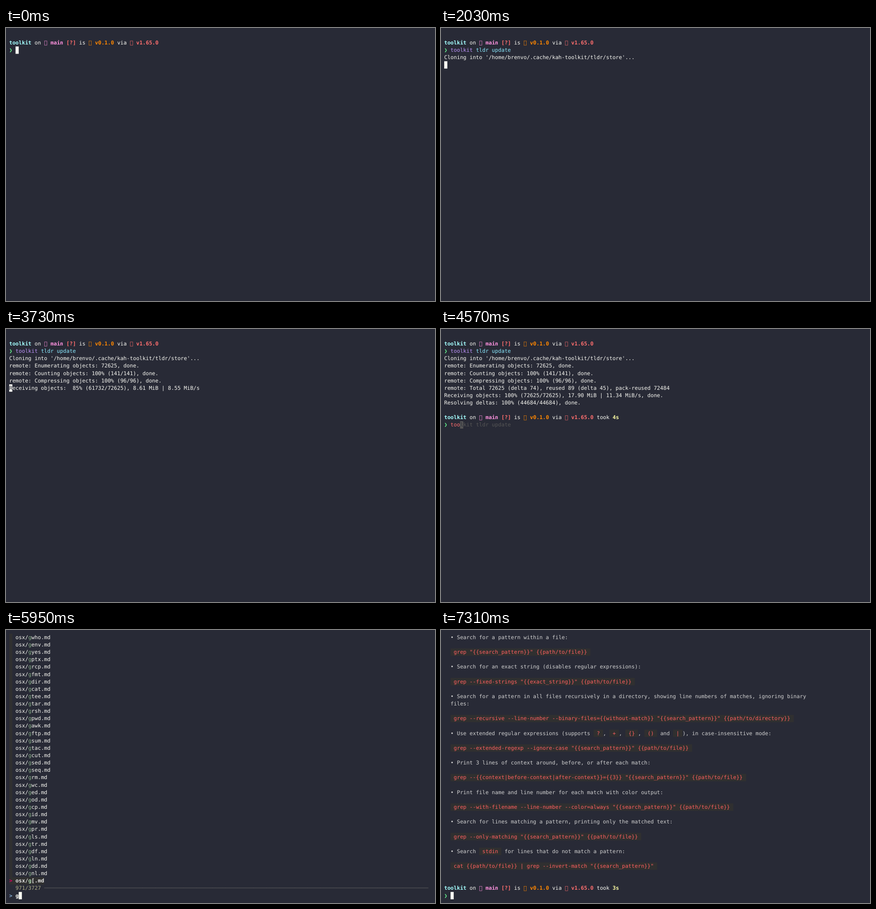
Write an HTML page that moves like this. It is 938x597 px and loops after 8 s.

```html
<!DOCTYPE html>
<html lang="en">
<head>
<meta charset="utf-8">
<title>Terminal session</title>
<style>
html, body { margin: 0; width: 100%; height: 100%; overflow: hidden; background: #282a36; }
svg { display: block; width: 100%; height: 100%; }
text {
  font: 11.541px "DejaVu Sans Mono", monospace;
  font-variant-ligatures: none;
  text-rendering: geometricPrecision;
  white-space: pre;
}
.b { font-weight: bold; }
</style>
</head>
<body>
<svg id="screen" viewBox="0 0 938 597"></svg>
<script>
const LOOP = 8000, COL = 938 / 135, ROW = 597 / 37, BASE = 11.8;
const BG = '#282a36', FG = '#f8f8f2', RED = '#ff6e6e', PURPLE = '#bd93f9', CYAN = '#8be9fd',
      DIM = '#555555', SHADE = '#303030';
const screen = document.getElementById('screen');
const left = col => (col + 1) * COL;
const top_ = row => (row + .5) * ROW;
let out = '';

function put(col, row, text, color = FG, bold = false) {
  out += `<text x="${left(col)}" y="${top_(row) + BASE}" fill="${color}"${bold ? ' class="b"' : ''}>${text}</text>`;
}
function block(col, row, cols, color, rows = 1) {
  out += `<rect x="${left(col)}" y="${top_(row)}" width="${cols * COL}" height="${rows * ROW}" fill="${color}"/>`;
}
function cursor(col, row, char = '', color = FG) {
  block(col, row, 1, color);
  if (char) put(col, row, char, BG);
}
// Empty box shown for a missing icon glyph
function icon(col, row, color) {
  out += `<rect x="${left(col) + .85}" y="${top_(row) + BASE - 7.85}" width="5.25" height="9.6" fill="none" stroke="${color}" stroke-width=".65"/>`;
}

function prompt(row, took) {
  put(0, row, 'toolkit', '#a4ffff', true);
  put(8, row, 'on');
  icon(11, row, '#ff92df');
  put(13, row, 'main', '#ff92df', true);
  put(18, row, '[?]', RED, true);
  put(22, row, 'is');
  icon(25, row, '#ff8700');
  put(27, row, 'v0.1.0', '#ff8700', true);
  put(34, row, 'via');
  icon(38, row, RED);
  put(40, row, 'v1.65.0', RED, true);
  if (took) {
    put(48, row, 'took');
    put(53, row, took, '#ffffa5', true);
  }
  put(0, row + 1, '❯', '#69ff94', true);
}

const COMMAND = 'toolkit tldr update';
function command(row, n, entered) {
  put(2, row, COMMAND.slice(0, Math.min(n, 7)), n < 7 ? RED : PURPLE);
  put(9, row, COMMAND.slice(7, Math.max(n, 7)), CYAN);
  if (entered) return;
  const hint = n ? COMMAND.slice(n) : '';
  put(3 + n, row, hint.slice(1), DIM);
  cursor(2 + n, row, hint[0], hint ? DIM : FG);
}

const firstKeys = Array.from({ length: 19 }, (_, i) => i < 8 ? 550 + 67 * i : 1180 + 61 * (i - 8));
const secondKeys = [4330, 4390, 4570, 4670, 4840, 4910, 4980, 5060, 5250, 5310, 5370, 5430];
const pressed = (keys, t) => keys.filter(k => k <= t).length;

function progress(label, pct, total, tail = '') {
  const n = Math.max(1, Math.ceil(total * pct / 100));
  return `${label}: ${String(pct).padStart(3)}% (${n}/${total})${tail}`;
}

function receiving(t) {
  const u = Math.floor((t - 3050) / 45) * 45 / 765;
  const rate = t < 3230 ? '' : t < 3500 ? ', 1.25 MiB | 2.48 MiB/s'
    : t < 3770 ? ', 8.61 MiB | 8.55 MiB/s' : ', 15.42 MiB | 10.21 MiB/s';
  return progress('Receiving objects', Math.floor(100 * u ** 1.22), 72625, rate);
}

function clone(t) {
  const lines = ["Cloning into '/home/brenvo/.cache/kah-toolkit/tldr/store'..."];
  let onLast = false;
  if (t >= 2840) {
    lines.push('remote: Enumerating objects: 72625, done.',
      progress('remote: Counting objects', 100, 141, ', done.'),
      t < 2890 ? progress('remote: Compressing objects', 1, 96)
               : progress('remote: Compressing objects', 100, 96, ', done.'));
    onLast = t < 2890;
  }
  if (t >= 3050 && t < 3815) {
    lines.push(receiving(t));
    onLast = true;
  }
  if (t >= 3815) {
    lines.push('remote: Total 72625 (delta 74), reused 89 (delta 45), pack-reused 72484',
      progress('Receiving objects', 100, 72625, ', 17.90 MiB | 11.34 MiB/s, done.'));
  }
  if (t >= 3840) {
    const done = t >= 3950;
    lines.push(progress('Resolving deltas', done ? 100 : t < 3870 ? 3 : 52, 44684, done ? ', done.' : ''));
    onLast = !done;
  }
  lines.forEach((line, i) => put(0, 3 + i, line));
  if (t >= 4030) return;
  if (onLast) cursor(0, 2 + lines.length, lines.at(-1)[0]);
  else cursor(0, 3 + lines.length);
}

function shell(t) {
  prompt(1);
  command(2, pressed(firstKeys, t), t >= 1850);
  if (t >= 2030) clone(t);
  else if (t >= 1850) cursor(0, 3);
  if (t >= 4030) {
    prompt(11, '4s');
    command(12, pressed(secondKeys, t));
  }
}

// Capitals mark the letters that match the query
const names = (dir, list) => list.split(' ').map(n => dir + '/' + n);
const allPages = names('common', 'xz tmux-plugin fossil-add cargo-build docker-load lzcat pip-install ' +
  'nmap kubectl-get hexdump gcloud-auth-login git-stash sox npm-audit rsync youtube-dl pandoc ' +
  'vim convert openssl-x509 just zstd jq hg-commit ffmpeg tree terraform php-artisan mkdir ' +
  'bundle watch aws-s3 dig ab');
const gPages = names('osx', 'who env yes ptx rcp fmt dir cat tee tar rsh pwd awk ftp sum tac cut sed seq ' +
  'rm wc ed od cp id mv pr ls tr df ln dd nl [').map(n => n.replace('/', '/G'));
const grepPages = [
  ...names('common', 'bzfGREP csvGREP bzeGREP pdfGREP ripGREP zipGREP zeGREP bzGREP psGREP zfGREP ' +
    'vGREP nGREP uGREP pGREP rGREP zGREP eGREP fGREP'),
  ...names('osx', 'GfgREP GegREP GgREP'),
  ...names('common', 'GnatpREP Git-REquest-Pull Git-for-each-REPo Git-filter-REPo Git-REv-Parse'),
  'osx/GREalPath',
  ...names('common', 'Git-REPlace Git-REPack Glab-REPo Git-REPl Gh-REPo git-GREP GREP')
];
const grPages = [
  ...grepPages.slice(0, 18),
  ...names('osx', 'GRealpath GReadlink'),
  ...names('common', 'GRafana-cli GRadle GRoups GRunt GRoff GRype'),
  'osx/GRmdir',
  ...names('common', 'GRex GRip GRep GRon'),
  ...names('osx', 'GRsh GRcp GRm')
];
const searches = [
  [5530, '', 3727, allPages], [5950, 'g', 971, gPages], [6030, 'gr', 402, grPages],
  [6070, 'gre', 161, grepPages], [6250, 'grep', 43, grepPages],
  [6320, 'grep.', 43, grepPages], [6400, 'grep.md', 43, grepPages]
];

function finder(t) {
  const [, query, count, pages] = searches.findLast(s => s[0] <= t);
  const ext = query.slice(4);
  block(0, 0, 1, SHADE, 34);
  pages.forEach((name, row) => {
    const chosen = row === 33;
    const mark = s => `<tspan fill="${chosen ? '#afd7af' : '#87af87'}">${s}</tspan>`;
    let hits = 0;
    const label = name.replace(/[A-Z]/g, c =>
      hits++ < query.length ? mark(c.toLowerCase()) : c.toLowerCase());
    if (chosen) {
      block(1, row, name.length + 4, SHADE);
      put(0, row, '&gt;', '#d7005f', true);
    }
    put(2, row, label + mark(ext) + '.md'.slice(ext.length), chosen ? '#e4e4e4' : FG, chosen);
  });
  const info = `${count}/3727`, start = info.length + 3;
  put(2, 34, info, '#afaf87');
  put(start, 34, '─'.repeat(132 - start), '#5f5f5f');
  put(0, 35, '&gt;', '#87afd7', true);
  put(2, 35, query, FG, true);
  cursor(2 + query.length, 35);
}

// Backticks enclose shaded code
const manual = `• Search for a pattern within a file:

\`grep "{{search_pattern}}" {{path/to/file}}\`

• Search for an exact string (disables regular expressions):

\`grep --fixed-strings "{{exact_string}}" {{path/to/file}}\`

• Search for a pattern in all files recursively in a directory, showing line numbers of matches, ignoring binary
files:

\`grep --recursive --line-number --binary-files={{without-match}} "{{search_pattern}}" {{path/to/directory}}\`

• Use extended regular expressions (supports \`?\`, \`+\`, \`{}\`, \`()\` and \`|\`), in case-insensitive mode:

\`grep --extended-regexp --ignore-case "{{search_pattern}}" {{path/to/file}}\`

• Print 3 lines of context around, before, or after each match:

\`grep --{{context|before-context|after-context}}={{3}} "{{search_pattern}}" {{path/to/file}}\`

• Print file name and line number for each match with color output:

\`grep --with-filename --line-number --color=always "{{search_pattern}}" {{path/to/file}}\`

• Search for lines matching a pattern, printing only the matched text:

\`grep --only-matching "{{search_pattern}}" {{path/to/file}}\`

• Search \`stdin\` for lines that do not match a pattern:

\`cat {{path/to/file}} | grep --invert-match "{{search_pattern}}"\``.split('\n');

function page() {
  manual.forEach((line, row) => {
    let col = 2;
    line.split('`').forEach((part, i) => {
      if (i % 2) {
        block(col, row, part.length + 2, SHADE);
        put(col + 1, row, part, '#ff5f5f');
        col += 2;
      } else if (part) put(col, row, part, '#d0d0d0');
      col += part.length;
    });
  });
  prompt(34, '3s');
  cursor(2, 35);
}

let shown;
function frame(now) {
  const t = now % LOOP;
  out = '';
  if (t < 5530) shell(t);
  else if (t < 7310) finder(t);
  else page();
  if (out !== shown) screen.innerHTML = shown = out;
  requestAnimationFrame(frame);
}
frame(performance.now());
</script>
</body>
</html>
```
